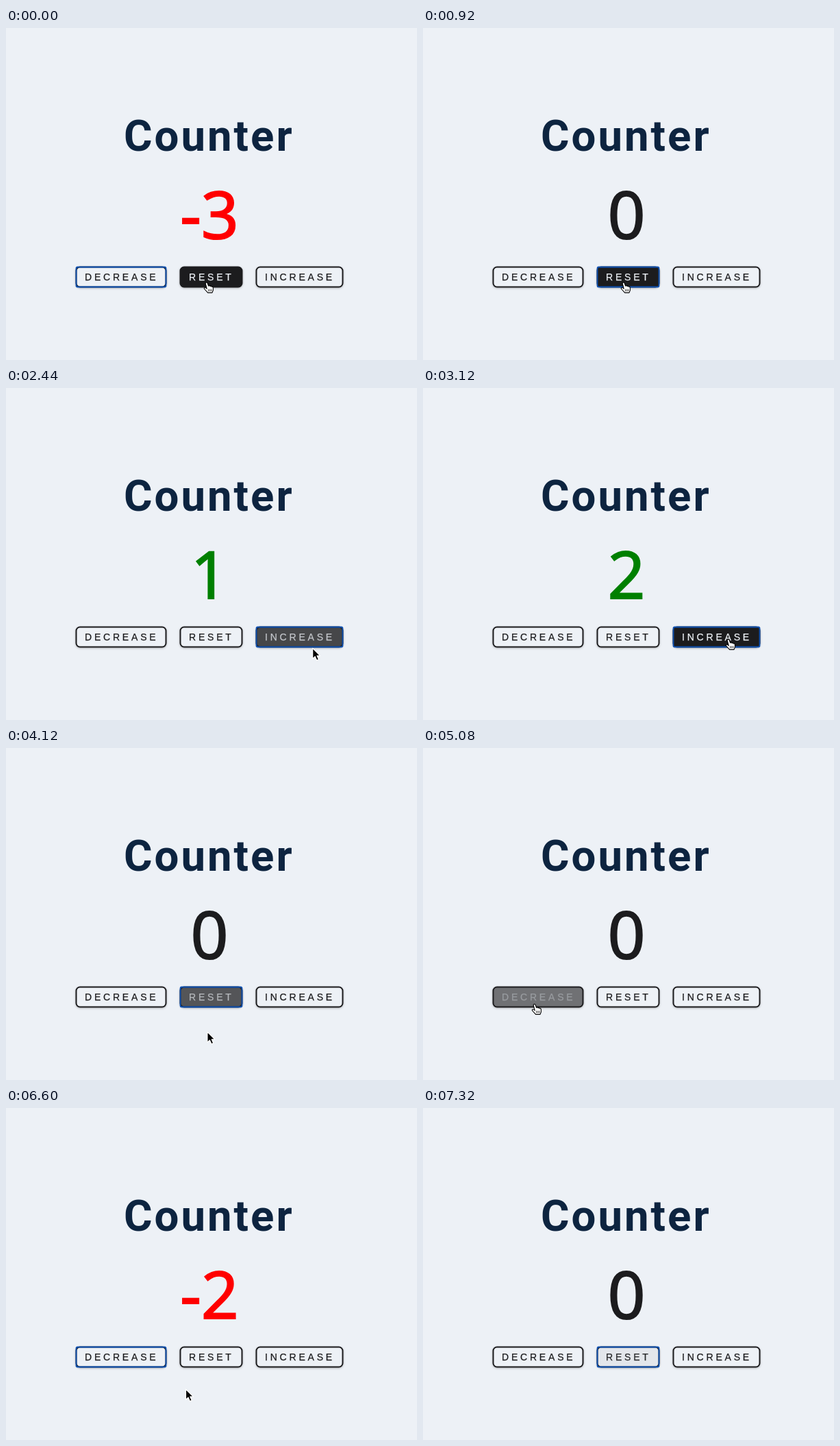
Recreate the animation shown at these times as an HTML page. Size 600x484 px, loop 7.36 s.

```html
<!DOCTYPE html>
<html lang="en">
<head>
<meta charset="utf-8">
<title>Counter</title>
<style>
  html, body { margin: 0; width: 100%; height: 100%; overflow: hidden; background: #edf1f6; }
  svg { display: block; width: 600px; height: 484px; }
  .title { font: 700 63.5px Roboto, sans-serif; letter-spacing: 3px; fill: #0d2440; }
  .value { font: 95.5px "Open Sans", "Noto Sans", sans-serif; text-anchor: middle; stroke-width: 2.2; }
  .label { font: 14px "Liberation Sans", Arial, sans-serif; letter-spacing: 3.8px; stroke-width: .25; }
  .box { stroke: #1c1c1e; stroke-width: 2; filter: drop-shadow(0 1px 1.5px rgba(0, 0, 0, .25)); }
  .ring { fill: none; stroke: #0f52b4; stroke-width: 1.8; }
</style>
</head>
<body>
<svg viewBox="0 0 600 484">
  <rect width="600" height="484" fill="#edf1f6"/>
  <text class="title" x="172" y="178.7">Counter</text>
  <text class="value" id="value" x="297" y="306.5"></text>
  <g id="buttons"></g>
  <g id="arrow">
    <path d="M0 0V15.2L3.5 12L6 17.6L8.8 16.3L6.4 10.9H11Z" fill="#000" stroke="#fff" stroke-width="1.2" stroke-linejoin="round"/>
  </g>
  <g id="hand">
    <path d="M-1.8 1C-2 -.8 .6 -1 1.2 .6L2.6 4.6C3.2 3.7 4.8 3.9 5.1 5C5.9 4.3 7.2 4.7 7.4 5.8C8.6 5.4 9.4 6 9.4 7.4V10.8L8 14.4H1.6L-3.3 9C-4.4 7.6 -2.6 6.3 -1.3 7.4L.2 8.6Z" fill="#fff" stroke="#000" stroke-width="1.1" stroke-linejoin="round"/>
    <path d="M2.6 9.2V12.4M4.7 9.2V12.4M6.8 9.2V12.4" fill="none" stroke="#000" stroke-width=".8"/>
  </g>
</svg>
<script>
const LOOP = 7360, STEP = 40, FADE = 300;
const APPROACH = 160, SETTLE = 80, LIFT = 20, GLIDE = 160;
const DECREASE = 0, RESET = 1, INCREASE = 2;
const PAPER = [237, 241, 246], INK = [28, 28, 30];

// Each visit: hover a button, click it, then glide away to a resting place
const visits = [
  { button: RESET, enter: -400, click: 860, leave: 1020, spot: [293, 371.5], away: [356, 436] },
  { button: INCREASE, enter: 1920, click: 2160, leave: 2380, spot: [446, 367], away: [448, 382] },
  { button: INCREASE, enter: 2760, click: 3080, leave: 3260, spot: [446, 367], away: [360, 402] },
  { button: RESET, enter: 3580, click: 3840, leave: 4040, spot: [293, 371.5], away: [294, 418] },
  { button: DECREASE, enter: 4900, click: 5200, leave: 5400, spot: [163, 374], away: [176, 405] },
  { button: DECREASE, enter: 5895, click: 6120, leave: 6260, spot: [178, 374], away: [230, 449] },
  { button: RESET, enter: 6640, click: 6800, leave: 7035, spot: [295, 371], away: [304, 510] }
];

const $ = id => document.getElementById(id);
const clamp = v => Math.min(1, Math.max(0, v));
const smooth = u => u * u * (3 - 2 * u);
const easeOut = u => 1 - (1 - u) ** 3;
const mix = (a, b, k) => a.map((v, i) => v + (b[i] - v) * k);
const shade = (a, b, k) => `rgb(${mix(a, b, k).map(Math.round)})`;

function add(parent, tag, attrs) {
  const el = document.createElementNS("http://www.w3.org/2000/svg", tag);
  for (const key in attrs) el.setAttribute(key, attrs[key]);
  return parent.appendChild(el);
}

const buttons = [["DECREASE", 102, 132], ["RESET", 254, 91], ["INCREASE", 365, 127]].map(([text, x, width]) => {
  const frame = { x: x + .5, y: 348.5, width: width - 1, height: 29 };
  const box = add($("buttons"), "rect", { class: "box", rx: 5.5, ...frame });
  const ring = add($("buttons"), "rect", { class: "ring", rx: 2, ...frame });
  const label = add($("buttons"), "text", { class: "label", x: x + 13, y: 368 });
  label.textContent = text;
  return { box, ring, label };
});

function paint(el, color) {
  el.setAttribute("fill", color);
  el.setAttribute("stroke", color);
}

function show(el, on) {
  el.setAttribute("visibility", on ? "visible" : "hidden");
}

// Reset gives up its focus once the pointer enters the next button
function counter(t) {
  let value = -3, focus = DECREASE;
  for (const v of visits) {
    if (t >= v.enter && v.enter > 0 && focus === RESET) focus = -1;
    if (t < v.click) break;
    focus = v.button;
    value = focus === RESET ? 0 : value + focus - RESET;
  }
  return { value, focus };
}

function hover(button, t) {
  return clamp(visits.filter(v => v.button === button)
    .reduce((sum, v) => sum + clamp((t - v.enter) / FADE) - clamp((t - v.leave) / FADE), 0));
}

function pointer(t) {
  const i = visits.findLastIndex(v => t >= v.enter - APPROACH);
  const { enter, leave, spot, away } = visits[i];
  const lift = leave - LIFT;
  if (t >= lift) return mix(spot, away, easeOut(clamp((t - lift) / (LIFT + GLIDE))));
  const from = i ? visits[i - 1].away : spot;
  return mix(from, spot, smooth(clamp((t - enter + APPROACH) / (APPROACH + SETTLE))));
}

function draw(t) {
  const { value, focus } = counter(t);
  $("value").textContent = value;
  paint($("value"), value < 0 ? "#ff0000" : value > 0 ? "#008000" : "#1c1c1e");

  buttons.forEach(({ box, ring, label }, i) => {
    const k = hover(i, t);
    box.setAttribute("fill", shade(PAPER, INK, k));
    paint(label, shade(INK, PAPER, k));
    show(ring, i === focus);
  });

  const over = visits.some(v => t >= v.enter && t < v.leave);
  const [x, y] = pointer(t);
  for (const id of ["hand", "arrow"]) {
    show($(id), over === (id === "hand"));
    $(id).setAttribute("transform", `translate(${x.toFixed(2)} ${y.toFixed(2)})`);
  }
}

const start = performance.now();
function tick() {
  const t = (performance.now() - start) % LOOP;
  draw(Math.floor(t / STEP) * STEP);
  requestAnimationFrame(tick);
}
tick();
</script>
</body>
</html>
```
